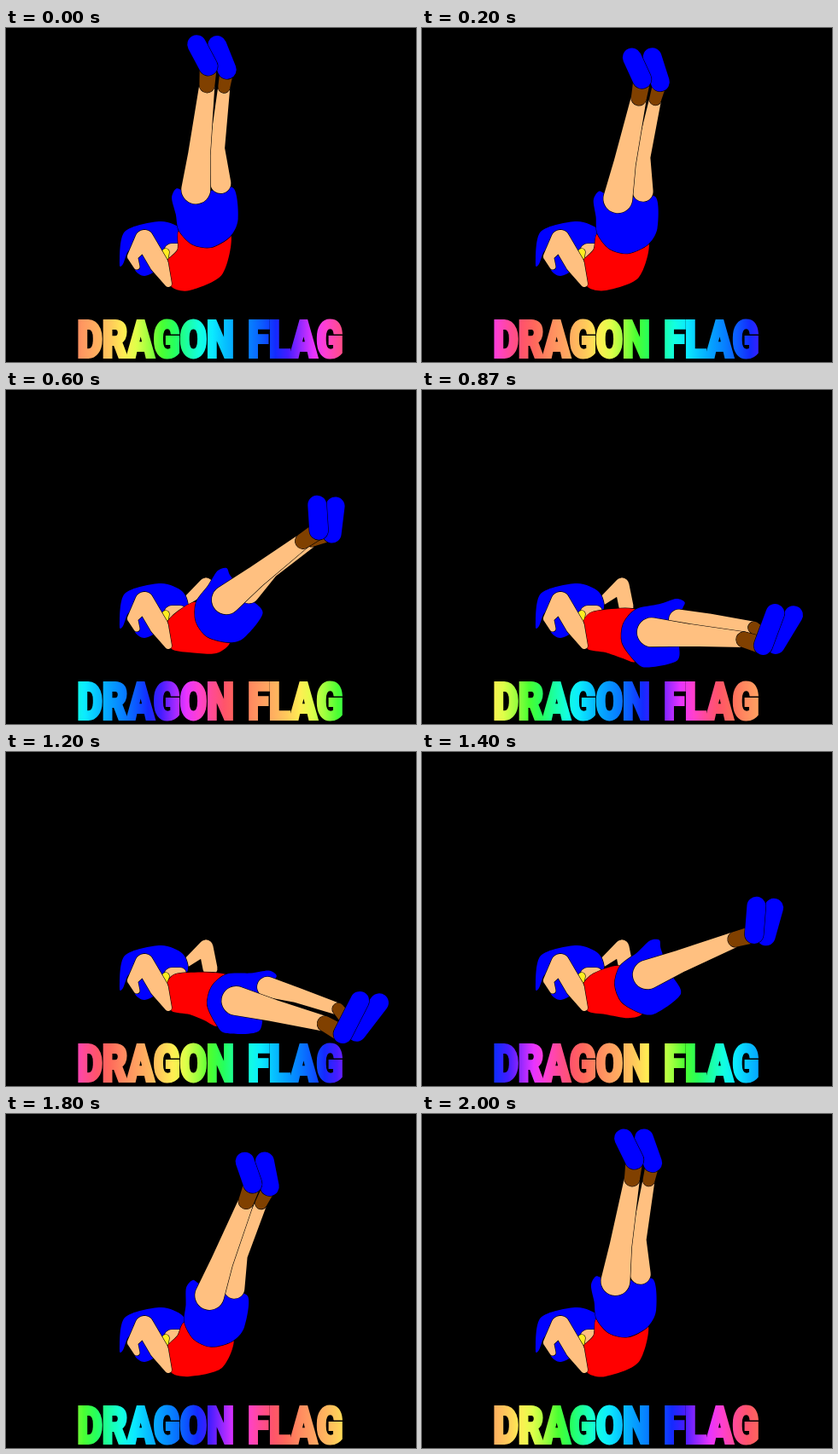
An HTML page with a canvas for the animation above (2070 ms loop, 480 by 392 pixels).

```html
<!DOCTYPE html>
<html lang="en">
<head>
<meta charset="utf-8">
<title>Dragon Flag</title>
<style>
html, body { margin: 0; width: 100%; height: 100%; overflow: hidden; background: #000; }
canvas { display: block; }
</style>
</head>
<body>
<canvas id="stage" width="480" height="392"></canvas>
<script>
const ctx = document.getElementById('stage').getContext('2d');
const LOOP = 2070, STEPS = 31;
const BLUE = '#00f', RED = '#f00', SKIN = '#ffc080', BROWN = '#804000', YELLOW = '#ffee20';
const mix = (a, b, t) => a + (b - a) * t;

// Leg swing in degrees from upright at a few steps of the loop
const swing = [[0, 1], [6, 18.6], [13, 86], [16, 96], [18, 95.5], [21, 60.8], [25, 26], [30, 4]];

function swingAt(step) {
  const n = swing.length, i = swing.findLastIndex(k => k[0] <= step);
  const [a, b, c, d] = [-1, 0, 1, 2].map(o => {
    const [time, angle] = swing[(i + o + n) % n];
    return { time: time + Math.floor((i + o) / n) * STEPS, angle };
  });
  const span = c.time - b.time, u = (step - b.time) / span;
  const slope = (p, q) => (q.angle - p.angle) / (q.time - p.time) * span;
  return mix(b.angle, c.angle, u * u * (3 - 2 * u))
    + u * (1 - u) ** 2 * slope(a, c) - u * u * (1 - u) * slope(b, d);
}

function paint(fill) {
  ctx.strokeStyle = '#000';
  ctx.lineWidth = 1.2;
  ctx.stroke();
  ctx.fillStyle = fill;
  ctx.fill();
}

// Chain of tapered capsules through joints [x, y, radius]
function limb(joints, fill) {
  ctx.beginPath();
  for (let i = 1; i < joints.length; i++) {
    const [x, y, r] = joints[i - 1], [x2, y2, r2] = joints[i];
    const a = Math.atan2(y2 - y, x2 - x);
    const b = Math.acos(Math.max(-1, Math.min(1, (r - r2) / Math.hypot(x2 - x, y2 - y))));
    ctx.moveTo(x + r * Math.cos(a + b), y + r * Math.sin(a + b));
    ctx.arc(x, y, r, a + b, a - b + 2 * Math.PI);
    ctx.arc(x2, y2, r2, a - b, a + b);
    ctx.closePath();
  }
  paint(fill);
}

// Smooth closed outline through points [x, y]
function blob(pts, fill) {
  const n = pts.length, at = i => pts[(i + n) % n];
  ctx.beginPath();
  ctx.moveTo(...at(0));
  for (let i = 0; i < n; i++) {
    const [a, b, c, d] = [-1, 0, 1, 2].map(o => at(i + o));
    ctx.bezierCurveTo(b[0] + (c[0] - a[0]) / 7, b[1] + (c[1] - a[1]) / 7,
      c[0] - (d[0] - b[0]) / 7, c[1] - (d[1] - b[1]) / 7, c[0], c[1]);
  }
  ctx.closePath();
  paint(fill);
}

// Joints from hip to toe: across and along the leg when upright, the same when lowered, radius
const frontLeg = [
  [-15, 40, -4, 3, 17], [-12, 80, 3, 46, 13], [-4, 164, 13, 109, 9], [-3, 186, 23, 131, 11], [-17, 212, -18, 147, 11]
];
const backLeg = [
  [14, 46, -24, 38, 12], [9, 87, -18, 72, 9], [16, 161, -6, 123, 7], [19, 181, 19, 147, 11], [7, 210, -18, 170, 11]
];
const shorts = [
  [-34, -11], [-18, -27], [4, -30], [26, -17], [35, 4], [29, 40], [0, 36], [-28, 36], [-38, 38], [-43, 27], [-38, 8]
];
const hair = [
  [133, 277], [139, 239], [181, 227], [207, 237], [212, 258], [185, 264],
  [177, 283], [162, 291], [151, 284], [150, 266], [143, 262], [137, 277]
];

function drawBody(step) {
  const angle = Math.max(0, swingAt(step)), k = angle / 96, a = angle * Math.PI / 180;
  const hipX = 235 + 31 * k ** .65, hipY = 225 + 71 * k ** .75;
  const place = (x, y) => [hipX + x * Math.cos(a) + y * Math.sin(a), hipY + x * Math.sin(a) - y * Math.cos(a)];
  const pose = leg => leg.map(([x, y, x2, y2, r]) => [...place(mix(x, x2, k ** 1.5), mix(y, y2, k ** .6)), r]);
  const sock = ([, , ankle, heel]) => [ankle, [heel[0], heel[1], ankle[2] + 1]];
  const front = pose(frontLeg), back = pose(backLeg);

  limb([[212, 247, 5], [234, 229, 8.5], [239, 254, 8.5]], SKIN);
  blob(hair, BLUE);
  limb([[194, 262, 9], [204, 260, 7]], SKIN);
  limb([[187, 263, 4], [187, 270, 3]], YELLOW);

  const waist = place(27, -15), bulge = 14 * (1 - k);
  blob([
    [188, 274], [201, 260], place(-33, -10), place(0, -10), waist,
    [(waist[0] + 215) / 2 + bulge, (waist[1] + 308) / 2 + bulge], [215, 308], [194, 304], [191, 288]
  ], RED);
  blob(shorts.map(([x, y]) => place(x, y > 0 ? y - k * x / 4 : y)), BLUE);
  limb(back.slice(0, 3), SKIN);
  limb(sock(back), BROWN);
  limb(front.slice(0, 3), SKIN);
  limb(sock(front), BROWN);
  limb(back.slice(3), BLUE);
  limb(front.slice(3), BLUE);

  limb([[153, 280, 3.5], [148, 268, 6], [162, 248, 11], [179, 277, 11], [190, 300, 4]], SKIN);
}

// One turn of the rainbow, from yellow to yellow
function rainbow(u) {
  const turn = 2 * Math.PI * u;
  const hue = 54 + 360 * u + 28 * Math.sin(turn) ** 2;
  return `hsl(${hue}, 100%, ${60 + 9 * Math.cos(turn + .8)}%)`;
}

function drawTitle(step) {
  const period = 355, start = 85 + (53 + step * 2 * period / STEPS) % period;
  const condense = .755, left = 83.5;
  const toText = x => (x - left) / condense;
  const colors = ctx.createLinearGradient(toText(start - period), 0, toText(start + period), 0);
  for (let i = 0; i <= 48; i++) colors.addColorStop(i / 48, rainbow(i / 24 % 1));
  ctx.save();
  ctx.transform(condense, 0, 0, 1, left, 386);
  ctx.font = '900 60px Roboto, "Open Sans", sans-serif';
  ctx.wordSpacing = '7px';
  ctx.fillStyle = ctx.strokeStyle = colors;
  ctx.lineWidth = 4;
  ctx.lineJoin = 'miter';
  ctx.miterLimit = 3;
  ctx.fillText('DRAGON FLAG', 0, 0);
  ctx.strokeText('DRAGON FLAG', 0, 0);
  ctx.restore();
}

function draw() {
  const step = Math.floor(performance.now() % LOOP * 3 / 200 + .051) % STEPS;
  ctx.fillStyle = '#000';
  ctx.fillRect(0, 0, 480, 392);
  drawTitle(step);
  drawBody(step);
  requestAnimationFrame(draw);
}
draw();
</script>
</body>
</html>
```
